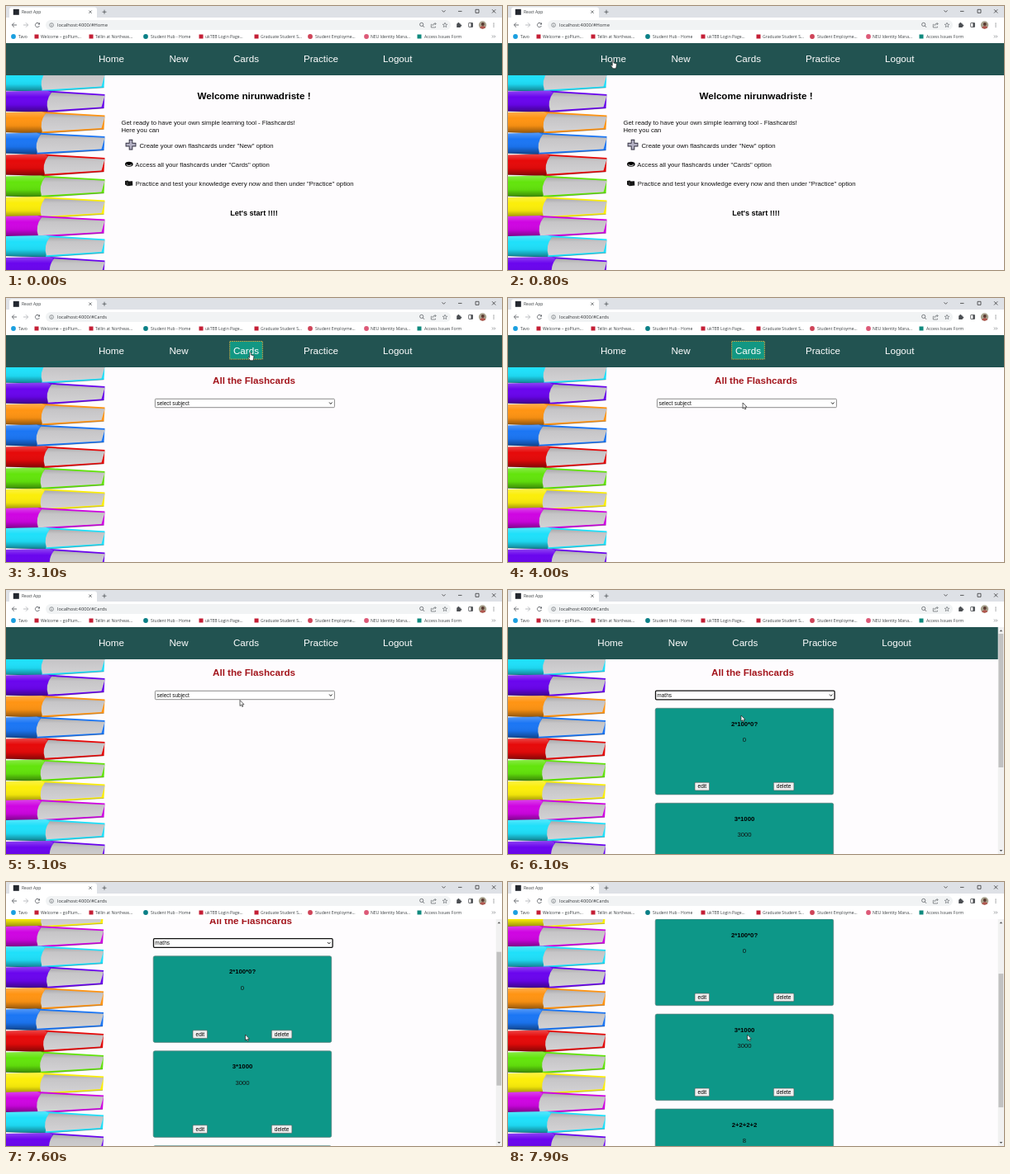
Animation of 600 by 320 pixels, one loop 8 s. Source, as an HTML page:

```html
<!DOCTYPE html>
<html lang="en">
<head>
<meta charset="utf-8">
<title>Flashcards</title>
<style>
html, body { margin: 0; width: 600px; height: 320px; overflow: hidden; background: #fff; }
svg { display: block; width: 600px; height: 320px; }
text { font-family: "Liberation Sans", Arial, sans-serif; white-space: pre; }
.ui { font-family: "Open Sans", "Noto Sans", sans-serif; }
.bold { font-weight: bold; }
.mid { text-anchor: middle; }
</style>
</head>
<body>
<svg id="stage" viewBox="0 0 600 320" xmlns="http://www.w3.org/2000/svg">
  <defs>
    <linearGradient id="shade" x2="0" y2="1">
      <stop offset="0" stop-color="#fff" stop-opacity=".25"/>
      <stop offset=".3" stop-color="#fff" stop-opacity="0"/>
      <stop offset=".65" stop-color="#000" stop-opacity=".05"/>
      <stop offset="1" stop-color="#000" stop-opacity=".45"/>
    </linearGradient>
    <linearGradient id="paper" x2="0" y2="1">
      <stop offset="0" stop-color="#aaa9ab"/>
      <stop offset=".25" stop-color="#c6c5c7"/>
      <stop offset="1" stop-color="#d3d2d4"/>
    </linearGradient>
    <clipPath id="face"><circle cx="576.5" cy="23" r="4.7"/></clipPath>
  </defs>
  <rect width="600" height="320" fill="#fefcfe"/>
  <g id="books"></g>
  <g id="page">
    <rect y="45" width="600" height="39" fill="#225351"/>
    <g id="nav"></g>
    <g id="home"></g>
    <g id="cards"></g>
    <g id="maths"></g>
  </g>
  <g id="bar"></g>
  <g id="chrome"></g>
  <g id="arrow"></g>
  <g id="hand"></g>
</svg>
<script>
const LOOP = 8000;
const TEAL = '#0d9788', GRAY = '#5f6368', INK = '#3c4043';
const $ = id => document.getElementById(id);

// time, page, focused link, pointer, x, y
const STATES = [
  [0, 'home', '', '', 0, 0],
  [800, 'home', '', 'hand', 127, 66],
  [1500, 'home', 'Home', 'hand', 127, 66],
  [2500, 'home', 'Home', 'hand', 295.5, 66],
  [3100, 'cards', 'Cards', 'hand', 295.5, 66],
  [3800, 'cards', 'Cards', 'arrow', 294, 88],
  [3900, 'cards', 'Cards', 'arrow', 289, 110],
  [4000, 'cards', 'Cards', 'arrow', 284, 127],
  [4300, 'cards', 'Cards', 'arrow', 283, 133],
  [4500, 'cards', '', 'arrow', 283, 133.5],
  [6100, 'maths', '', 'arrow', 282, 152],
  [7100, 'maths', '', 'arrow', 289.5, 185]
];

// label, text x, highlight width
const LINKS = [['Home', 112, 39.6], ['New', 197.5], ['Cards', 275, 39.6], ['Practice', 360], ['Logout', 456]];

const CYAN = '#1fe0fa', PURPLE = '#6a05ee', MAGENTA = '#cf05e2', YELLOW = '#fbee0a';
// top, spine width, colour
const BOOKS = [
  [29, 43, YELLOW], [53, 38, MAGENTA], [77.5, 43, CYAN], [102.5, 50, PURPLE],
  [128, 43, '#ff9413'], [153.5, 37, '#1b76f4'], [179.5, 46, '#e60a0a'],
  [205.5, 42, '#63e40c'], [231, 42, YELLOW], [254, 38, MAGENTA],
  [278, 48, CYAN], [304, 53, PURPLE]
];

const CARDS = [['2*100*0?', '0'], ['3*1000', '3000'], ['2+2+2+2', '8']];

// icon x, icon colour, round icon, text x, text
const RED = '#c41e35';
const MARKS = [
  [9, '#1b9fe0', 1, 15, 'Tavo'],
  [37, RED, 0, 42, 'Welcome – goPlum...'],
  [103, RED, 0, 108, 'Tellin at Northeas...'],
  [169, '#0b8087', 1, 175, 'Student Hub - Home'],
  [236, RED, 0, 241, 'ukTEB Login Page...'],
  [303, RED, 0, 308, 'Graduate Student S...'],
  [368, '#cf4458', 1, 374, 'Student Employme...'],
  [436, '#dd5a78', 1, 441, 'NEU Identity Mana...'],
  [500, '#0f8a7e', 0, 506, 'Access Issues Form']
];

const text = (str, x, y, size, fill = '#111', cls = '') =>
  `<text x="${x}" y="${y}" font-size="${size}" fill="${fill}" class="${cls}">${str}</text>`;
const rect = (x, y, w, h, fill, extra = '') =>
  `<rect x="${x}" y="${y}" width="${w}" height="${h}" fill="${fill}" ${extra}/>`;
const round = (x, y, w, h, r, fill, stroke = 'none', width = 0.6) =>
  rect(x, y, w, h, fill, `rx="${r}" stroke="${stroke}" stroke-width="${width}"`);
const disc = (x, y, r, fill) => `<circle cx="${x}" cy="${y}" r="${r}" fill="${fill}"/>`;
const path = (d, fill, stroke = 'none', width = 0.7) =>
  `<path d="${d}" fill="${fill}" stroke="${stroke}" stroke-width="${width}"/>`;
const line = (d, stroke, width = 0.7) => path(d, 'none', stroke, width);

function book([y, w, color]) {
  const R = 119.5;
  return `<g transform="translate(0 ${y})">` +
    path(`M0 1L${w} 0L${R} 4.5L${R - 1} 21.5L${w} 26.5L0 25z`, color) +
    path(`M0 1L${w} 0L${w + 4} 2L${w} 26.5L0 25z`, 'url(#shade)') +
    path(`M${w + 5} 2.3L${R} 6.3L${R - 4} 20L${w + 1} 24.3Q${w - 3} 13 ${w + 5} 2.3z`, 'url(#paper)') +
    line(`M0 25L${w} 26.4L${R - 1} 21.4`, 'rgba(0,0,0,.35)') + '</g>';
}

function link([name, x, w]) {
  const box = w ? `<g id="on${name}">` + rect(x - 4.3, 52.5, w, 21.6, '#129783',
    'stroke="#efb23c" stroke-width=".9" stroke-dasharray="1.5 1"') + '</g>' : '';
  return box + text(name, x, 67.6, 11.6, '#fff');
}

function home() {
  return text('Welcome nirunwadriste !', 300, 113, 11.6, '#000', 'bold mid') +
    text('Get ready to have your own simple learning tool - Flashcards!', 139.5, 144.3, 7.73) +
    text('Here you can', 139.5, 153.3, 7.73) +
    line('M151 161.8v12.6M144.6 168.1h12.8', '#2e2c3c', 4.6) +
    line('M151 162.7v10.8M145.5 168.1h11', '#b4b1c4', 2.8) +
    text('Create your own flashcards under "New" option', 161.5, 171.8, 7.73) +
    `<ellipse cx="148.8" cy="191.8" rx="4.8" ry="3"/>` +
    line('M145.5 192.6l3.3 1l3.2 -1', '#eee', 1) +
    text('Access all your flashcards under "Cards" option', 156.3, 194.6, 7.73) +
    path('M144 212l3.5 -.6l1 1l4.5 -.2l.3 5.2l-6.3 .8l-3 -1.7z', '#151515') +
    line('M146.5 213.5l.5 4', '#777', 0.6) +
    text('Practice and test your knowledge every now and then under "Practice" option', 156.8, 217.8, 7.73) +
    text("Let's start !!!!", 300, 254.2, 9.05, '#000', 'bold mid');
}

const heading = x => text('All the Flashcards', x, 104, 11.6, '#a3151c', 'bold mid');

const picker = (label, x) => text(label, x + 2, 129.9, 6.5) +
  line(`M${x + 210.7} 126.5l1.7 2l1.7 -2`, '#111', 0.9);

const button = (label, x, y, w) => round(x, y, w, 9.6, 1, '#efefef', '#555') +
  text(label, x + w / 2, y + 6.9, 6.44, '#000', 'mid');

function card([ask, answer], i) {
  const y = 143.3 + i * 115;
  return round(178.2, y, 215.5, 104.6, 2, TEAL, '#5f7f7b', 0.7) +
    text(ask, 286, y + 21.6, 7.73, '#000', 'bold mid') +
    text(answer, 286, y + 41, 7.73, '#111', 'mid') +
    button('edit', 226, y + 90, 17.5) +
    button('delete', 321.3, y + 90, 24.6);
}

function star(x, y) {
  const pts = Array.from({ length: 10 }, (_, i) => {
    const r = i % 2 ? 1.3 : 3, a = i * Math.PI / 5 - Math.PI / 2;
    return (x + r * Math.cos(a)).toFixed(2) + ' ' + (y + r * Math.sin(a)).toFixed(2);
  });
  return line('M' + pts.join('L') + 'z', GRAY, 0.6);
}

function mark([ix, color, circle, tx, label]) {
  return (circle ? disc(ix, 37, 2.9, color) : rect(ix - 2.5, 34.5, 5, 5, color)) +
    text(label, tx, 38.9, 5.05, INK, 'ui');
}

function chrome() {
  const tabs = rect(0, 0, 600, 14, '#dee1e6') +
    round(4, 1.5, 106, 16, 3, '#fff') +
    rect(0, 14, 600, 31, '#fff') +
    rect(8.8, 3.8, 7, 7, '#23272f') +
    text('React App', 19, 9.2, 5, INK, 'ui') +
    line('M100.3 5.5l3.4 3.4m0 -3.4l-3.4 3.4M116.5 7.2h5m-2.5 -2.5v5', INK) +
    line('M527.5 5.3l2 2l2 -2M547 6.4h4.5M568 4.3h4v4h-4zM588 4.2l4.3 4.3m0 -4.3l-4.3 4.3', '#222');
  const left = line('M13 23h-5.7m2.7 -2.7l-2.7 2.7l2.7 2.7', GRAY, 0.9) +
    line('M21 23h5.7m-2.7 -2.7l2.7 2.7l-2.7 2.7', '#b5b7ba', 0.9) +
    line('M40.4 24A2.6 2.6 0 1 1 40 21.4', GRAY, 0.9) +
    path('M41 20v2.6h-2.6z', GRAY) +
    round(48, 17, 490, 12, 6, '#f1f3f4') +
    round(52.7, 20.7, 4.8, 4.8, 2.4, 'none', GRAY) +
    line('M55.1 21.4v.7m0 .7v1.8', GRAY) +
    `<text id="url" x="62" y="25.1" font-size="5.75" fill="#303336" class="ui"></text>`;
  const right = round(500.6, 20.3, 4.2, 4.2, 2.1, 'none', GRAY, 0.8) +
    line('M504.3 24l1.7 1.8', GRAY, 0.9) +
    line('M515.4 22.3h-1.1v3.7h5.2v-1.2M516 24l1 -2.2l3 -.2m-1.4 -1.6l1.6 1.6l-1.6 1.6', GRAY) +
    star(531, 23.2) +
    rect(545.2, 21.4, 4.6, 4.6, '#4a4d51') + disc(547.4, 21.2, 1.2, '#4a4d51') + disc(550, 23.6, 1.2, '#4a4d51') +
    round(559.7, 20.5, 4.8, 5, 0.4, 'none', '#4a4d51', 0.8) + rect(562.4, 20.5, 2.1, 5, '#4a4d51') +
    '<g clip-path="url(#face)">' + rect(571, 18, 11, 11, '#a9a38f') +
    disc(576.8, 22, 2, '#5a3a30') + disc(576.8, 28, 3.8, '#b0564e') + '</g>' +
    [21, 23, 25].map(y => disc(590, y, 0.6, '#4a4d51')).join('');
  return tabs + left + right + MARKS.map(mark).join('') +
    line('M588 35.5l1.5 1.5l-1.5 1.5m2.3 -3l1.5 1.5l-1.5 1.5', GRAY, 0.6);
}

$('books').innerHTML = BOOKS.map(book).join('');
$('nav').innerHTML = LINKS.map(link).join('');
$('home').innerHTML = home();
$('cards').innerHTML = heading(300) + round(180.4, 122.3, 217, 10.4, 1, '#fff', '#6f6f6f', 0.8) +
  picker('select subject', 180.4);
$('maths').innerHTML = heading(296) + round(178.5, 122.2, 216.6, 10.6, 1.2, '#fff', '#101010', 1.3) +
  picker('maths', 178.3) + CARDS.map(card).join('');
$('bar').innerHTML = rect(592.7, 45, 7.3, 275, '#f1f1f1') +
  rect(593.4, 53, 5.8, 162, '#c1c1c1', 'id="thumb"') +
  path('M594.6 50.3l1.8 -2l1.8 2zM594.6 315l1.8 2l1.8 -2z', '#505050');
$('chrome').innerHTML = chrome();
$('arrow').innerHTML = path('M0 0v7l1.6 -1.4l1.1 2.4l1.1 -.5l-1 -2.3l2.1 -.1z', '#fff', '#222');
$('hand').innerHTML = path('M-.8 .3L0 -.2L.8 .3L.9 3L4 3.7L4.4 4.6L4 8L3.4 9.8H0L-2.6 6.3L-2.2 5.4L-.8 6.4z', '#fff', '#222');

const show = (id, on) => $(id).setAttribute('display', on ? 'inline' : 'none');
const move = (id, how) => $(id).setAttribute('transform', how);

function draw(t) {
  const [, page, focus, pointer, x, y] = STATES.findLast(s => s[0] <= t);
  const open = page === 'maths';
  const scroll = t < 7300 ? 0 : 8.8 + 14.9 * Math.floor((t - 7300) / 100);

  for (const id of ['home', 'cards', 'maths']) show(id, id === page);
  for (const name of ['Home', 'Cards']) show('on' + name, name === focus);
  for (const id of ['arrow', 'hand']) {
    show(id, id === pointer);
    move(id, `translate(${x} ${y})`);
  }
  show('bar', open);
  // the bookshelf stays put while the page scrolls
  move('books', `scale(${open ? 0.988 : 1} 1)`);
  move('page', `translate(0 ${-scroll})`);
  move('nav', `translate(${open ? -3.7 : 0} 0)`);
  move('thumb', `translate(0 ${scroll * 0.592})`);
  $('url').textContent = 'localhost:4000/#' + (page === 'home' ? 'Home' : 'Cards');
}

const start = performance.now();
function tick() {
  draw((performance.now() - start) % LOOP);
  requestAnimationFrame(tick);
}
tick();
</script>
</body>
</html>
```
